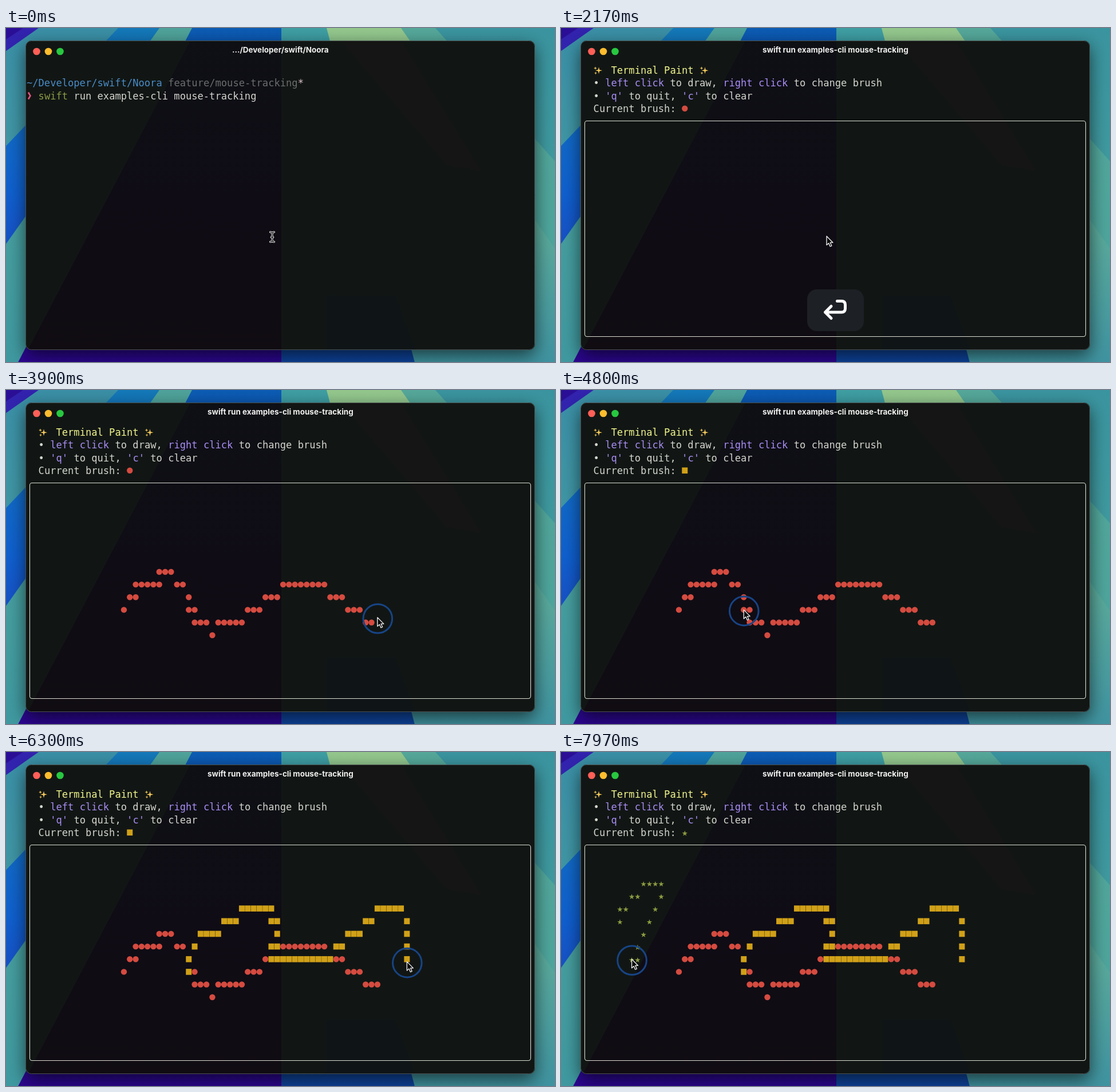
Recreate the animation shown at these times as an HTML page with a canvas. Size 959 by 584 pixels, loop 8 s.

```html
<!DOCTYPE html>
<html lang="en">
<head>
<meta charset="utf-8">
<title>Terminal Paint</title>
<style>
  html, body { margin: 0; width: 100%; height: 100%; overflow: hidden; background: #111614; }
  canvas { display: block; }
</style>
</head>
<body>
<canvas id="stage" width="959" height="584"></canvas>
<script>
const ctx = document.getElementById('stage').getContext('2d');
const W = 959, H = 584, LOOP = 8000;
const RUN_AT = 900, APP_AT = 1500;
const CELL_W = 10.3, CELL_H = 22.15;
const MONO = '17.1px "DejaVu Sans Mono", monospace';
const TITLE = 'bold 13.5px Inter, sans-serif';
const INK = '#d3d4cd', PURPLE = '#a98df5';

const cellX = col => 36 + CELL_W * (col + 0.5);
const cellY = row => 74.3 + CELL_H * row;
const clamp = v => Math.max(0, Math.min(1, v));
const mix = (a, b, u) => a + (b - a) * u;
const ease = u => u * u * (3 - 2 * u);

// The pointer glides to a stroke, right-clicks to pick its brush, then draws
// through the key points (column, row), one cell per step.
const strokes = [
  { brush: 'dot', glide: [2250, 2930], start: 3088, step: 17.3, keys: [
    [16, 14], [18, 12.6], [18, 12.4], [22, 11.6], [22, 11.3], [24, 11.3], [27, 12.9], [27, 14], [28, 14.4],
    [28, 14.6], [31, 15.55], [33, 15.4], [43, 12.4], [50, 12.3], [57, 14.6], [59, 14.6]] },
  { brush: 'square', glide: [3940, 4440], pick: 4700, start: 5503, step: 16.6, keys: [
    [27, 14], [27, 13], [29, 11.45], [36, 9.4], [41, 9.4], [41, 10], [42, 10.3], [42, 12], [41, 12.4],
    [41, 13], [51, 12.7], [59, 9.3], [63, 9.3], [64, 10.2], [64, 13.2]] },
  { brush: 'star', glide: [6370, 6730], pick: 6970, start: 7630, step: 22, keys: [
    [6, 10], [6, 9.3], [10, 7.4], [13, 7.2], [13, 8], [9, 12], [9, 13], [8, 13]] }
];

// Samples the key points once per cell along the longer axis.
function trace(keys) {
  const trail = [keys[0]];
  keys.slice(1).forEach(([x, y], i) => {
    const [px, py] = keys[i];
    const n = Math.max(1, Math.round(Math.max(Math.abs(x - px), Math.abs(y - py))));
    for (let k = 1; k <= n; k++) trail.push([mix(px, x, k / n), mix(py, y, k / n)]);
  });
  return trail;
}

const presses = [];
for (const s of strokes) {
  s.trail = trace(s.keys);
  if (s.pick) presses.push([s.pick, s.pick + 120]);
  presses.push([s.start - 40, s.start + s.trail.length * s.step + 10]);
}

function between([ax, ay], [bx, by], u) {
  return [mix(ax, bx, u), mix(ay, by, u)];
}

function pointerAt(t) {
  let position = [464, 364];
  for (const { glide: [from, to], start, step, trail } of strokes) {
    const points = trail.map(([col, row]) => [cellX(col), cellY(row)]);
    if (t < start) return between(position, points[0], ease(clamp((t - from) / (to - from))));
    const progress = Math.min((t - start) / step + 0.3, points.length - 1.001);
    const i = Math.floor(progress);
    position = between(points[i], points[i + 1], progress - i);
  }
  return position;
}

function polygon(points, fill) {
  ctx.beginPath();
  points.forEach(([x, y]) => ctx.lineTo(x, y));
  ctx.closePath();
  ctx.fillStyle = fill;
  ctx.fill();
}

function circle(x, y, r, fill) {
  ctx.beginPath();
  ctx.arc(x, y, r, 0, Math.PI * 2);
  ctx.fillStyle = fill;
  ctx.fill();
}

function roundRect(x, y, w, h, r) {
  ctx.beginPath();
  ctx.roundRect(x, y, w, h, r);
}

function starShape(x, y, outer, inner, tips, fill) {
  polygon(Array.from({ length: tips * 2 }, (_, i) => {
    const r = i % 2 ? inner : outer, a = Math.PI * (i / tips - 0.5);
    return [x + r * Math.cos(a), y + r * Math.sin(a)];
  }), fill);
}

function verticalGradient(...colors) {
  const g = ctx.createLinearGradient(0, 0, 0, H);
  colors.forEach((c, i) => g.addColorStop(i / Math.max(1, colors.length - 1), c));
  return g;
}

// Rays fan out from a point above the stage; each starts where it crosses the top edge
// and is covered by the next one to its right.
function drawWallpaper() {
  const apexX = 481, apexY = -300, depth = 1300;
  const bottomX = x => mix(apexX, x, (depth - apexY) / -apexY);
  const rays = [
    [-900, '#2a0f96'], [30, '#3222ae', '#2440c0'], [57, '#3a8fa6', '#4aa3a0'], [196, '#1478b8', '#0f5fce', '#2a2cae'],
    [268, '#4fa39a', '#3f99a0'], [325, '#0b5cb4', '#1b2c9c', '#2c0590'], [481, '#3f9fa2', '#2070ac', '#0d429c'],
    [560, '#94c78c', '#62b09a', '#3f93a0'], [690, '#55a89a', '#4aa39c'], [750, '#3a949f', '#46a19d']
  ];
  for (const [x, ...colors] of rays) {
    polygon([[x, 0], [3000, 0], [9000, depth], [bottomX(x), depth]], verticalGradient(...colors));
  }
}

function drawWindow() {
  ctx.save();
  ctx.shadowColor = 'rgba(0,0,0,.6)';
  ctx.shadowBlur = 30;
  ctx.shadowOffsetY = 10;
  roundRect(34.5, 22, 889.5, 541, 10);
  ctx.fillStyle = '#111614';
  ctx.fill();
  ctx.restore();

  ctx.save();
  roundRect(34.5, 22, 889.5, 541, 10);
  ctx.clip();
  polygon([[322, 22], [481, 22], [481, 563], [38, 563]], verticalGradient('#0e1015', '#0f0c15', '#100c12'));
  polygon([[585, 22], [690, 22], [830, 250], [770, 240]], '#141514');
  polygon([[560, 468], [680, 468], [715, 563], [560, 563]], '#0f1417');
  ctx.restore();

  roundRect(34.5, 22.5, 889, 540, 10);
  ctx.strokeStyle = '#4b504f';
  ctx.lineWidth = 1;
  ctx.stroke();
  ['#ff5f57', '#febc2e', '#28c840'].forEach((c, i) => circle(53.5 + 20.5 * i, 41, 6.3, c));
}

function drawTitle(text) {
  ctx.font = TITLE;
  ctx.textAlign = 'center';
  ctx.fillStyle = '#f0f0ee';
  ctx.fillText(text, 479.3, 43.3);
  ctx.textAlign = 'left';
}

// Parts are alternating text and colour.
function drawLine(row, col, ...parts) {
  ctx.font = MONO;
  for (let i = 0; i < parts.length; i += 2) {
    ctx.fillStyle = parts[i + 1];
    ctx.fillText(parts[i], 36 + col * CELL_W, cellY(row) + 6);
    col += parts[i].length;
  }
}

function drawPrompt(t) {
  drawLine(1, 0, '~/Developer/swift/Noora', '#4a8cc7', ' feature/mouse-tracking', '#6b6d6c', '*', '#dcc3ca');
  drawLine(2, 2, 'swift', '#8d9a45', ' run examples-cli mouse-tracking', INK);
  ctx.strokeStyle = '#e3557f';
  ctx.lineWidth = 2.6;
  ctx.stroke(new Path2D('M39 112.5L42.5 118.5L39 124.5'));
  if (t >= 470 && t < RUN_AT) {
    ctx.fillStyle = '#bbb';
    ctx.fillRect(438, 107, 1, 23);
  }
}

const brushes = {
  dot: (x, y) => circle(x, y, 5.2, '#d54b40'),
  square(x, y) {
    ctx.fillStyle = '#d0a018';
    ctx.fillRect(x - 5, y - 5.3, 10, 10.6);
  },
  star: (x, y) => starShape(x, y + 1.7, 5, 2, 5, '#8b9a40')
};

function drawSparkles(x, y) {
  starShape(x + 9, y, 6, 1.7, 4, '#f3c95c');
  starShape(x + 3, y - 4, 3, 1, 4, '#f3c95c');
  starShape(x + 3.5, y + 4.5, 2.6, 0.9, 4, '#f3c95c');
}

function drawApp(t) {
  drawSparkles(57, cellY(0));
  drawLine(0, 5, 'Terminal Paint', '#f1f58c');
  drawSparkles(242.5, cellY(0));
  drawLine(1, 2, '• ', INK, 'left click', PURPLE, ' to draw, ', INK, 'right click', PURPLE, ' to change brush', INK);
  drawLine(2, 2, '• ', INK, "'q'", PURPLE, ' to quit, ', INK, "'c'", PURPLE, ' to clear', INK);
  drawLine(3, 2, 'Current brush: ', INK);
  const current = strokes.findLast(s => !s.pick || t >= s.pick + 20).brush;
  brushes[current](cellX(17), cellY(3));

  roundRect(41.5, 162.5, 875, 377, 4);
  ctx.strokeStyle = '#dcddd2';
  ctx.lineWidth = 1.1;
  ctx.stroke();

  // A later mark replaces whatever its cell held before.
  const painted = new Map();
  for (const { brush, start, step, trail } of strokes) {
    trail.forEach((point, i) => {
      const cell = point.map(Math.round);
      if (t >= start + i * step) painted.set(cell.join(), [brush, ...cell]);
    });
  }
  for (const [brush, col, row] of painted.values()) brushes[brush](cellX(col), cellY(row));
}

function drawReturnKey(t) {
  const alpha = clamp((t - RUN_AT) / 150) * clamp((2480 - t) / 260);
  if (!alpha) return;
  ctx.save();
  ctx.globalAlpha = alpha;
  roundRect(430, 457, 99, 73, 17);
  ctx.fillStyle = '#1d2025';
  ctx.fill();
  ctx.strokeStyle = '#fff';
  ctx.lineWidth = 5;
  ctx.lineCap = ctx.lineJoin = 'round';
  ctx.stroke(new Path2D('M472 486.5L461.5 497L472 507.5M461.5 497H490Q496.5 497 496.5 490.5V484Q496.5 477.5 490 477.5H482.5'));
  ctx.restore();
}

function drawRing(t, x, y) {
  for (const [down, up] of presses) {
    const grow = clamp((t - down) / 100), release = clamp((t - up) / 200);
    if (t < down || release === 1) continue;
    ctx.globalAlpha = grow * (1 - release * release);
    ctx.beginPath();
    ctx.arc(x + 0.5, y + 2, 19 + 6.3 * grow + 18 * release, 0, Math.PI * 2);
    ctx.strokeStyle = '#174486';
    ctx.lineWidth = 3;
    ctx.stroke();
    ctx.globalAlpha = 1;
  }
}

const arrow = new Path2D('M0 0V15.5L3.6 12.2L6.1 18L8.8 16.8L6.3 11.2H11Z');
const beam = new Path2D('M-3.5 -8.5Q0 -8.5 0 -6.5Q0 -8.5 3.5 -8.5M0 -6.5V6.5M-3.5 8.5Q0 8.5 0 6.5Q0 8.5 3.5 8.5M-1.8 0.5H1.8');

function drawPointer(t, x, y) {
  ctx.save();
  ctx.lineJoin = 'round';
  if (t < APP_AT) {
    ctx.translate(x + 1, y + 1.3);
    ctx.lineCap = 'round';
    [['#f2f2f2', 3.2], ['#000', 1.2]].forEach(([color, width]) => {
      ctx.strokeStyle = color;
      ctx.lineWidth = width;
      ctx.stroke(beam);
    });
  } else {
    ctx.translate(x, y);
    ctx.fillStyle = '#0a0a0a';
    ctx.fill(arrow);
    ctx.strokeStyle = '#f4f4f4';
    ctx.lineWidth = 1.3;
    ctx.stroke(arrow);
  }
  ctx.restore();
}

function draw(t) {
  ctx.clearRect(0, 0, W, H);
  drawWallpaper();
  drawWindow();
  drawTitle(t < RUN_AT ? '.../Developer/swift/Noora' : 'swift run examples-cli mouse-tracking');
  if (t < APP_AT) drawPrompt(t);
  else drawApp(t);
  drawReturnKey(t);
  const [x, y] = pointerAt(t);
  drawRing(t, x, y);
  drawPointer(t, x, y);
}

const startTime = performance.now();
function tick() {
  draw((performance.now() - startTime) % LOOP);
  requestAnimationFrame(tick);
}
tick();
</script>
</body>
</html>
```
